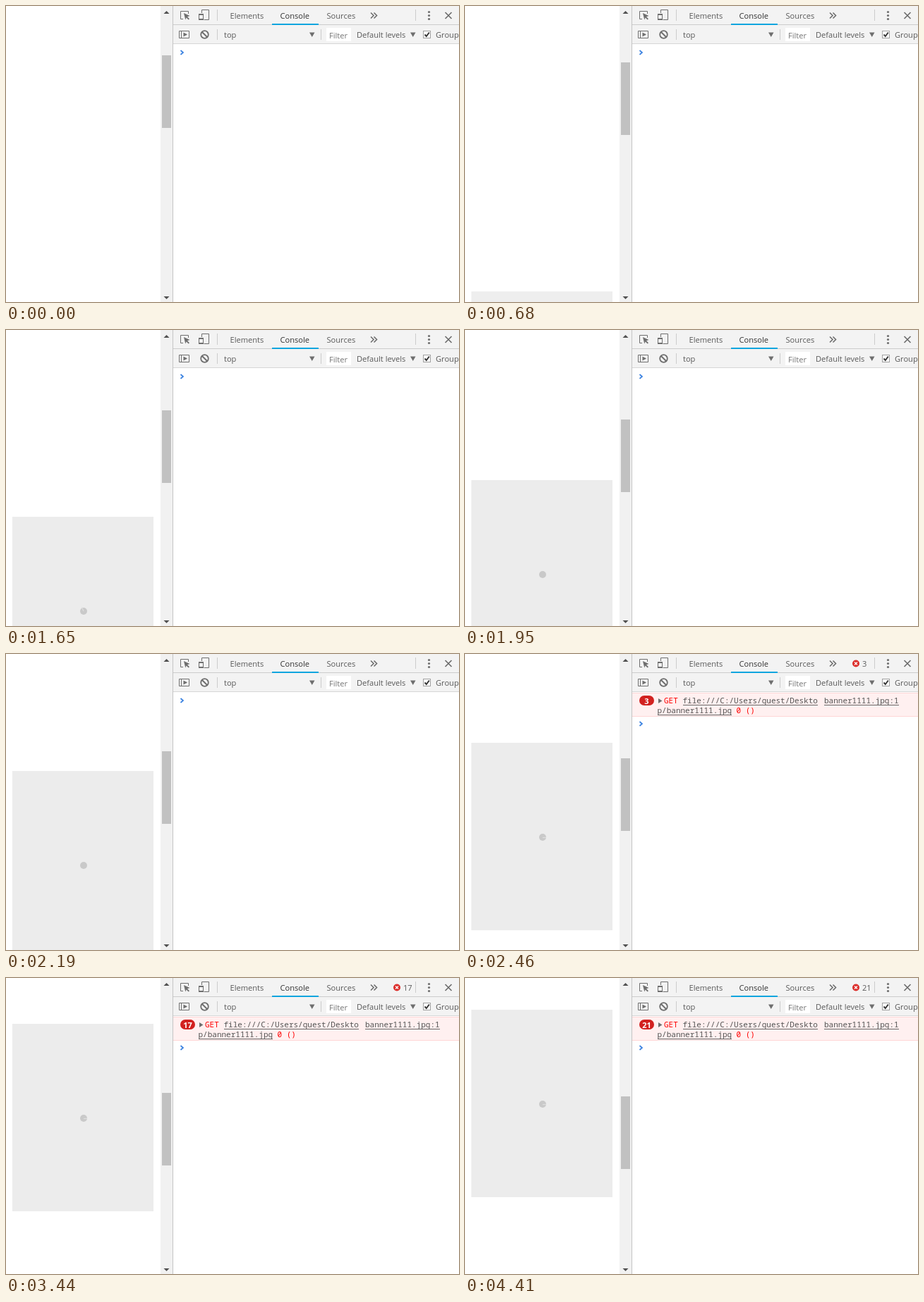
Animation of 642 by 420 pixels, one loop 5530 ms. Source, as an HTML page:

```html
<!DOCTYPE html>
<html lang="en">
<head>
<meta charset="utf-8">
<title>Lazy loading</title>
<style>
  html, body { margin: 0; width: 100%; height: 100%; overflow: hidden; background: #fff; }
  svg { display: block; }
  text { font: 11.1px "Open Sans", "Noto Sans", sans-serif; fill: #5a5a5a; white-space: pre; }
  .mono text { font: 11px "Noto Sans Mono", "DejaVu Sans Mono", monospace; fill: #f00; }
  .mono .link { fill: #545454; }
  .mono .badge { font: bold 11px "Open Sans", "Noto Sans", sans-serif; fill: #fff; text-anchor: middle; }
  .line { fill: none; stroke: #6e6e6e; }
  .fill { fill: #6e6e6e; }
  .sep { fill: #ccc; }
</style>
</head>
<body>
<svg width="642" height="420" viewBox="0 0 642 420">
  <rect width="642" height="420" fill="#fff"/>

  <!-- page -->
  <g id="block">
    <rect id="card" x="9" width="200" height="266"/>
    <circle cx="110" cy="134" r="5" fill="#c9c9c9"/>
    <path id="notch" stroke="#dedede" stroke-width="1.2"/>
  </g>

  <!-- scrollbar -->
  <rect x="219" width="17" height="420" fill="#f1f1f1"/>
  <rect id="thumb" x="221" width="13" height="103" fill="#c1c1c1"/>
  <path d="M223.5 11h8l-4-4zM223.5 412h8l-4 4z" fill="#505050"/>
  <rect x="236" width="1" height="420" fill="#c4c4c4"/>

  <!-- tab bar -->
  <rect x="237" width="405" height="53" fill="#f3f3f3"/>
  <rect x="237" y="26" width="405" height="1" class="sep"/>
  <rect x="237" y="53" width="405" height="1" fill="#d6d6d6"/>
  <rect x="377" y="25" width="66" height="2" fill="#10a5de"/>
  <path class="line" d="M251 18.5h-3.5v-11h11v3.500"/>
  <path class="fill" d="M252 10l8.500 4-3.500 1.200 3 3-1.400 1.400-3-3-1.300 3z"/>
  <path class="line" d="M277.500 10v-4.500h10v14h-7M273.500 11.500h6v8h-6z"/>
  <path class="fill" d="M273 11h7v2h-7zM273 18h7v2h-7z"/>
  <text x="317.500" y="18">Elements</text>
  <text x="388.500" y="18" style="fill:#333">Console</text>
  <text x="454.500" y="18">Sources</text>
  <path class="line" stroke-width="1.600" d="M517 9.500l4 4-4 4M521.500 9.500l4 4-4 4"/>
  <g class="fill">
    <circle cx="599.500" cy="8.500" r="1.600"/>
    <circle cx="599.500" cy="13.500" r="1.600"/>
    <circle cx="599.500" cy="18.500" r="1.600"/>
  </g>
  <path class="line" stroke-width="1.700" d="M622.500 9l9 9M631.500 9l-9 9"/>
  <path class="sep" d="M299 5h1v16h-1zM580 5h1v16h-1zM299 33h1v15h-1zM446 33h1v15h-1z"/>

  <!-- filter bar -->
  <path class="line" d="M245.500 35.500h14v10h-14zM248.500 35.500v10"/>
  <path class="fill" d="M251.500 37.500l5.500 3-5.500 3z"/>
  <circle class="line" cx="281.500" cy="40.500" r="5.300" stroke-width="1.800"/>
  <path class="line" stroke-width="1.800" d="M278 37l7 7"/>
  <text x="309" y="45">top</text>
  <path class="fill" d="M430 37.500h7.500l-3.750 6.500zM573 37.500h7.500l-3.750 6.500z"/>
  <rect x="454" y="31" width="35" height="19" fill="#fff"/>
  <text x="458" y="46" style="fill:#777">Filter</text>
  <text x="497" y="45">Default levels</text>
  <rect x="591.500" y="35.500" width="10" height="10" fill="#fff" stroke="#a0a0a0"/>
  <path d="M593.500 40.500l2.300 2.500 4-5.500" fill="none" stroke="#333" stroke-width="1.900"/>
  <text x="609" y="45">Group</text>

  <!-- errors -->
  <g id="errors">
    <circle cx="554" cy="13.500" r="5" fill="#dc2f2c"/>
    <path d="M552 11.500l4 4M556 11.500l-4 4" stroke="#fff" stroke-width="1.200"/>
    <text class="count" x="563" y="18"></text>
    <rect x="237" y="55" width="405" height="34" fill="#ffd6d6"/>
    <rect x="237" y="56" width="405" height="32" fill="#fff0f0"/>
    <rect x="247" y="59" width="21" height="14" rx="7" fill="#d2211f"/>
    <path class="fill" d="M274 63l5.500 3.500-5.500 3.500z"/>
    <g class="mono">
      <text class="count badge" x="257.500" y="70.500"></text>
      <text x="282" y="70">GET</text>
      <text class="link" x="308.500" y="70">file:///C:/Users/guest/Deskto</text>
      <text class="link" x="509" y="70">banner1111.jpg:1</text>
      <text class="link" x="272.500" y="84">p/banner1111.jpg</text>
      <text x="384.500" y="84">0 ()</text>
      <path d="M309 72.500h191M509 72.500h106M273 86.500h105" stroke="#666"/>
    </g>
  </g>
  <path id="prompt" d="M247.500 63l3.500 3-3.500 3" fill="none" stroke="#3b82e0" stroke-width="1.700"/>
</svg>
<script>
  const LOOP = 5530;
  // start time, top of the block, error count
  const steps = [
    [0, 445, 0], [530, 441, 0], [680, 405, 0], [990, 369, 0], [1140, 365, 0],
    [1260, 325, 0], [1380, 291, 0], [1520, 285, 0], [1650, 265, 0], [1810, 245, 0],
    [1950, 213, 0], [2070, 205, 0], [2190, 166, 0], [2340, 147, 0], [2460, 126, 3],
    [2580, 115, 5], [2730, 88, 11], [2850, 85, 12], [3440, 65, 17], [3560, 45, 21]
  ];
  const $ = id => document.getElementById(id);
  const counters = document.querySelectorAll('.count');

  function notchPath(t) {
    if (t < 1810) return 'M110 134L107.500 128.500';
    if (t < 2340) return '';
    const length = t >= 3870 && t < 4260 ? 4 : 5;
    return `M110 134.500h${length}`;
  }

  function draw(t) {
    const [, top, count] = steps.findLast(([start]) => start <= t);
    $('block').setAttribute('transform', `translate(0 ${top})`);
    $('card').setAttribute('fill', t < 1380 ? '#eee' : '#ececec');
    $('notch').setAttribute('d', notchPath(t));
    $('thumb').setAttribute('y', Math.floor(80.5 + (405 - top) / 4.09));
    $('errors').style.display = count ? '' : 'none';
    $('prompt').setAttribute('transform', `translate(0 ${count ? 33 : 0})`);
    counters.forEach(el => { el.textContent = count; });
  }

  const start = performance.now();
  function tick() {
    draw((performance.now() - start) % LOOP);
    requestAnimationFrame(tick);
  }
  tick();
</script>
</body>
</html>
```
